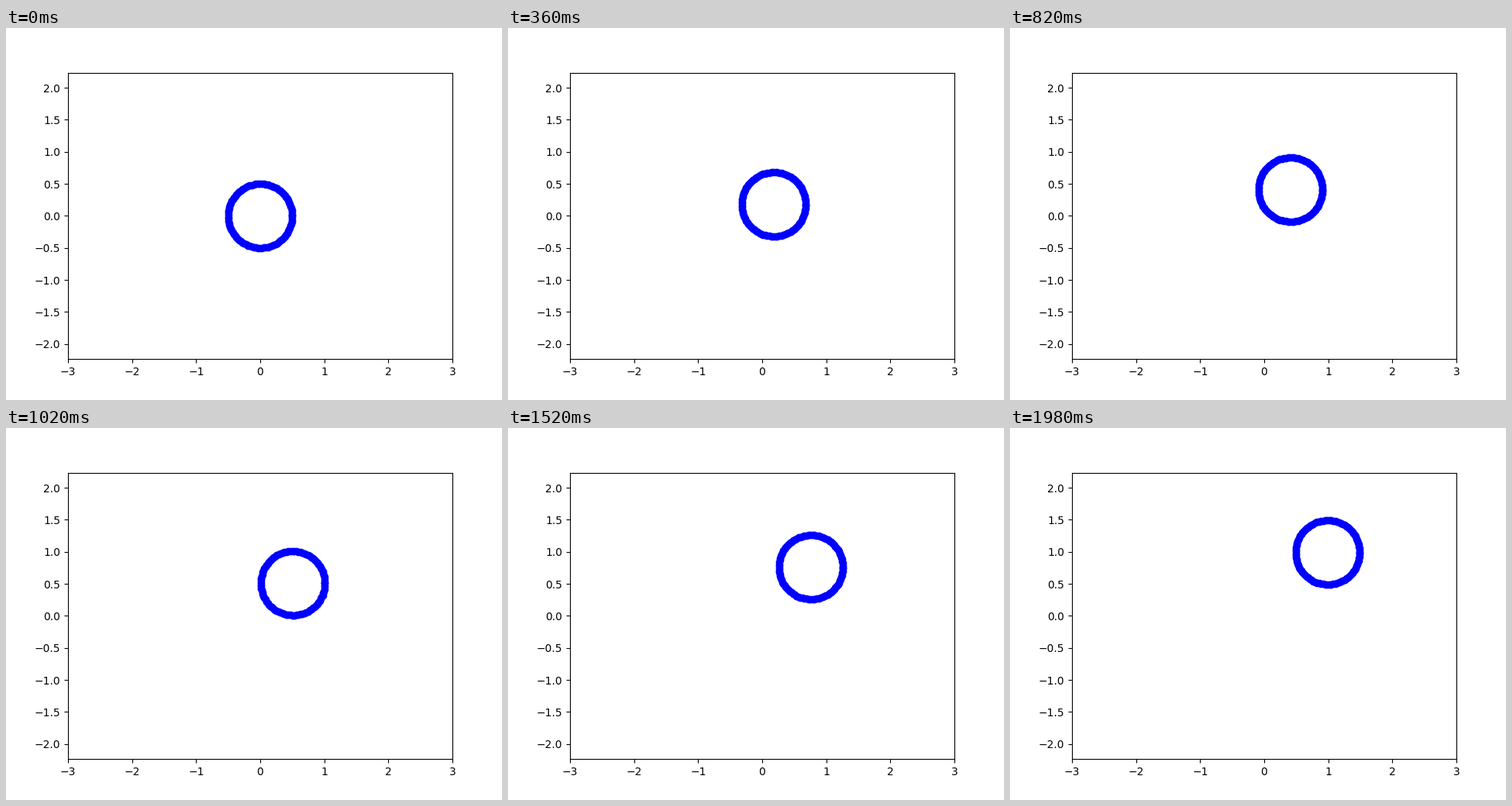
Animation, 640 px wide and 480 px high, one loop 2 s. Source, as a matplotlib script:

```python
import numpy as np
import matplotlib.pyplot as plt
from matplotlib.animation import FuncAnimation

FRAMES = 100
INTERVAL = 20  # ms
RADIUS = 0.5
STEP = 0.01    # shift of the centre per frame, along x and y

angle = np.linspace(0, 2 * np.pi, 100)
ring_x = RADIUS * np.cos(angle)
ring_y = RADIUS * np.sin(angle)

fig, ax = plt.subplots(figsize=(6.4, 4.8), dpi=100)
ax.set_xlim(-3, 3)
# Equal units: the y range follows from the shape of the axes box.
box = ax.get_window_extent()
half_height = 3 * box.height / box.width
ax.set_ylim(-half_height, half_height)
ring, = ax.plot([], [], "bo")


def update(i):
    shift = i * STEP
    ring.set_data(ring_x + shift, ring_y + shift)
    return ring,


ani = FuncAnimation(fig, update, frames=FRAMES, interval=INTERVAL,
                    repeat=True, repeat_delay=0, blit=True)

plt.show()
```
